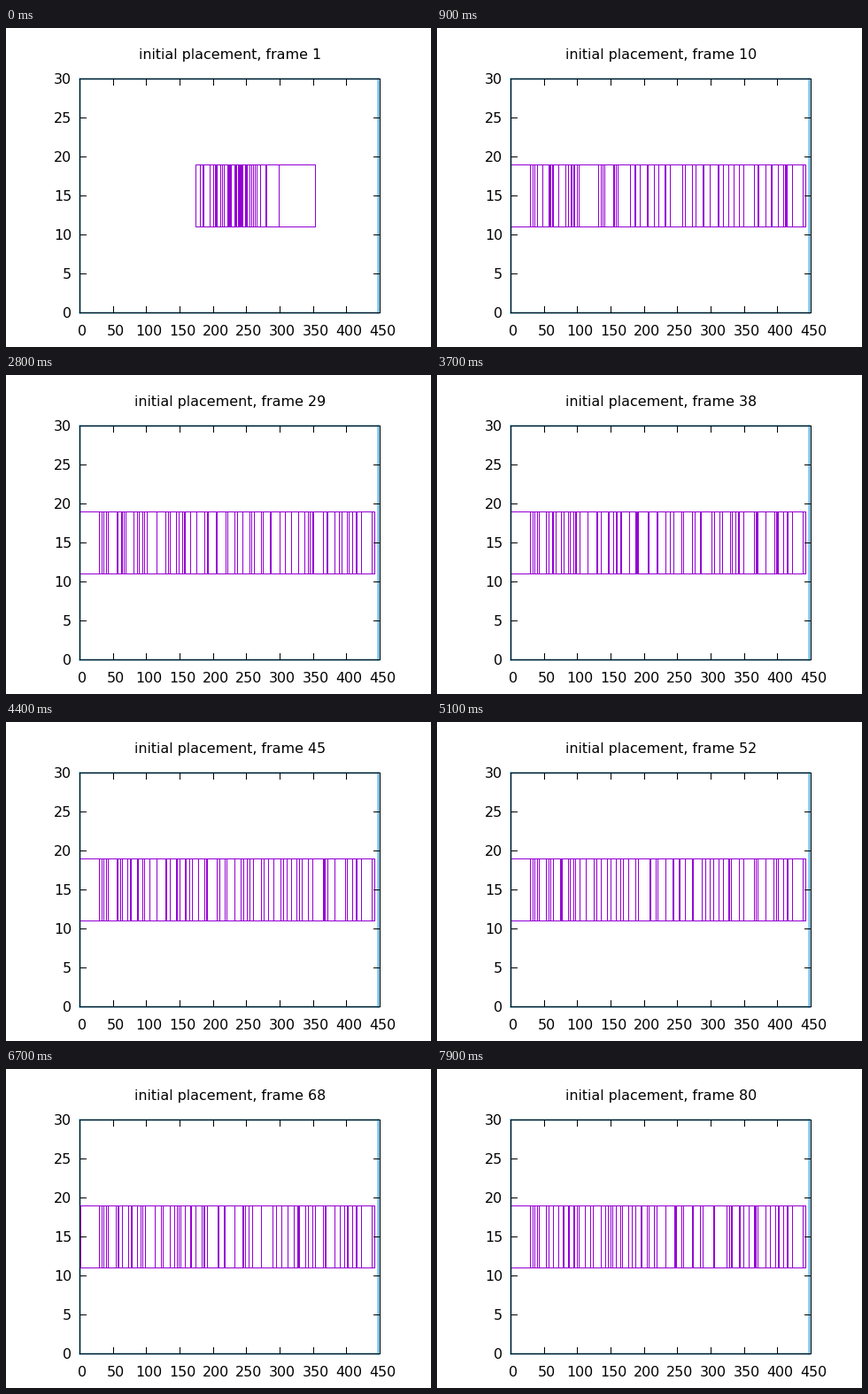
Animation, 480 px wide and 360 px high, one loop 8000 ms. Source, as a matplotlib script:

```python
import matplotlib.pyplot as plt
import numpy as np
from matplotlib.animation import FuncAnimation
from matplotlib.collections import LineCollection

W, H, DPI = 480, 360, 100
PX = 72 / DPI
LEFT, RIGHT, TOP, BOTTOM = 83, 422, 57, 321
ROW_TOP, ROW_BOTTOM, ROW_END = 154, 224, 416
PURPLE, BLUE = "#9400d3", "#56b4e9"
FRAMES, LOOSE = 80, 52

# Cell edges that keep their place once the row is filled
ANCHORS = [105, 108, 110, 113, 126, 131, 148, 154, 185, 202, 224, 258, 288,
           341, 346, 358, 371, 385, 391, 395, 401, 413, ROW_END]

rng = np.random.default_rng(7)
cluster = np.clip(rng.normal(264, 22, 56), 219, 322).round()
cluster = np.unique(np.append(cluster, [214, 349]))


def anneal():
    """Loose edges wander in jumps that shrink as the row cools."""
    home = np.linspace(116, 394, LOOSE) + rng.normal(0, 2, LOOSE)
    t = np.arange(FRAMES)[:, None]
    size = 1.2 + 5 * np.exp(-t / 12)
    hot_end = np.interp(t, [60, 79], [397, 370])
    moves = (rng.random((FRAMES, LOOSE)) < 0.25) & (home < hot_end)
    steps = rng.normal(0, 1, (FRAMES, LOOSE)) * size * moves
    return np.clip(home + steps.cumsum(axis=0), 115, 396).round()


walks = anneal()


def edges(i):
    if i == 0:
        return cluster
    # Now and then a narrow cell lands at the far left
    narrow = [LEFT + 1] if i % 36 == 31 else []
    return np.unique(np.concatenate([narrow, ANCHORS, walks[i]]))


fig = plt.figure(figsize=(W / DPI, H / DPI), dpi=DPI, facecolor="white")
ax = fig.add_axes([0, 0, 1, 1])
ax.set(xlim=(0, W), ylim=(H, 0))
ax.axis("off")


def line(x0, y0, x1, y1, color="black", width=1, z=3):
    ax.plot([x0 + .5, x1 + .5], [y0 + .5, y1 + .5], color=color, snap=False,
            lw=width * PX, solid_capstyle="projecting", zorder=z)


def box(x0, y0, x1, y1, **style):
    for y in (y0, y1):
        line(x0, y, x1, y, **style)
    for x in (x0, x1):
        line(x, y0, x, y1, **style)


def label(x, y, text, ha="center"):
    return ax.text(x, y, text, ha=ha, va="baseline", fontsize=15.92 * PX,
                   family="DejaVu Sans")


box(LEFT, TOP, 420, BOTTOM, color=BLUE, width=2, z=1)
box(LEFT, TOP, RIGHT, BOTTOM)
for v in range(0, 451, 50):
    x = round(LEFT + v * (RIGHT - LEFT) / 450)
    line(x, TOP, x, TOP + 7)
    line(x, BOTTOM - 7, x, BOTTOM)
    label(x + 3, 347, str(v))
for v in range(0, 31, 5):
    y = BOTTOM - v * (BOTTOM - TOP) // 30
    line(LEFT, y, LEFT + 7, y)
    line(RIGHT - 7, y, RIGHT, y)
    label(74, y + 6, str(v), ha="right")

title = label(252.7, 35, "")
cells = LineCollection([], colors=PURPLE, linewidths=PX, zorder=2)
cells.set_snap(False)
ax.add_collection(cells)


def update(i):
    xs = edges(i)
    start, end = (xs[0], xs[-1]) if i == 0 else (LEFT + 1, ROW_END)
    segs = [[(x + .5, ROW_TOP), (x + .5, ROW_BOTTOM + 1)] for x in xs]
    segs += [[(start, y + .5), (end + 1, y + .5)] for y in (ROW_TOP, ROW_BOTTOM)]
    cells.set_segments(segs)
    title.set_text(f"initial placement, frame {i + 1}")
    return cells, title


anim = FuncAnimation(fig, update, frames=FRAMES, interval=100, repeat=True,
                     repeat_delay=0)
plt.show()
```
